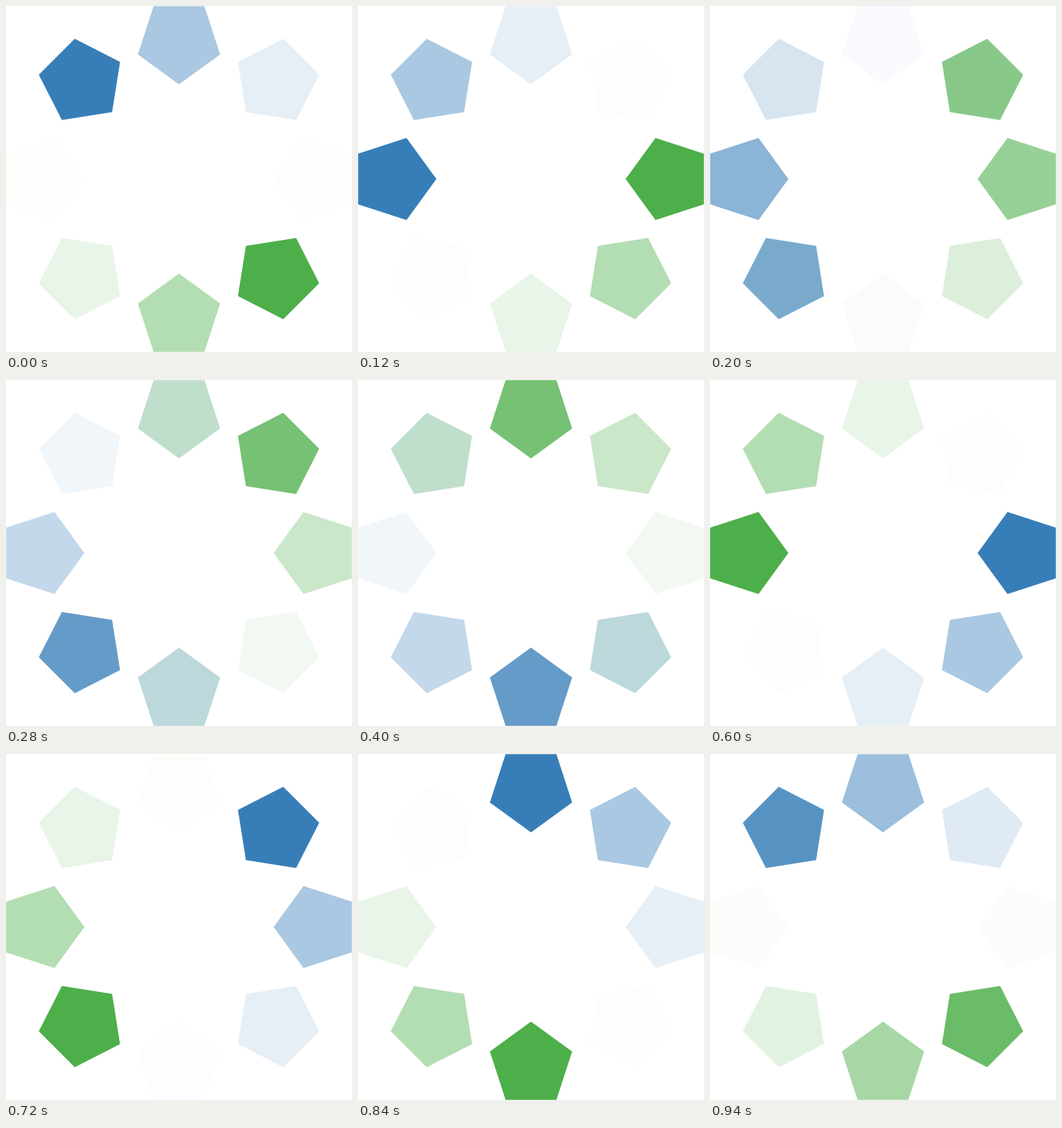
An HTML page with a canvas that plays this animation: 512 by 512 pixels, repeating every 960 ms.

```html
<!DOCTYPE html>
<html lang="en">
<head>
<meta charset="utf-8">
<title>Pentagon ring</title>
<style>
  html, body { margin: 0; width: 100%; height: 100%; overflow: hidden; background: #fff; }
  canvas { display: block; width: 512px; height: 512px; }
</style>
</head>
<body>
<canvas id="stage" width="512" height="512"></canvas>
<script>
const ctx = document.getElementById("stage").getContext("2d");
const LOOP = 960, TICK = 20, COUNT = 8;
const STEP = LOOP / COUNT, WAKE = LOOP / 2, FADE = WAKE - STEP;
const CENTER = 256, RING = 204, RADIUS = 64;
const BLUE = [55, 126, 184], GREEN = [77, 175, 74];

const mod = (a, n) => ((a % n) + n) % n;
const lerp = (a, b, t) => a + (b - a) * t;
const wake = age => (1 - age / WAKE) ** 3;

// One vertex of each pentagon points at the middle of the stage.
function pentagon(angle) {
  const cx = CENTER + RING * Math.cos(angle);
  const cy = CENTER + RING * Math.sin(angle);
  const path = new Path2D();
  for (let i = 0; i < 5; i++) {
    const a = angle + Math.PI + i * Math.PI * 2 / 5;
    path.lineTo(cx + RADIUS * Math.cos(a), cy + RADIUS * Math.sin(a));
  }
  path.closePath();
  return path;
}

const shapes = Array.from({ length: COUNT }, (_, i) =>
  pentagon((5 - i) * Math.PI / 4));

// Each pentagon fades in a cubic wake, then rises in the other colour.
function drawShape(shape, phase) {
  const age = phase % WAKE;
  const [color, next] = phase < WAKE ? [BLUE, GREEN] : [GREEN, BLUE];
  const rise = Math.max(0, (age - FADE) / STEP);
  const blend = 1 - (1 - rise) ** 3;
  const rgb = color.map((c, i) => Math.round(lerp(c, next[i], blend)));
  ctx.globalAlpha = rise ? lerp(wake(FADE), 1, rise) : wake(age);
  ctx.fillStyle = `rgb(${rgb})`;
  ctx.fill(shape);
}

function draw(time) {
  ctx.globalAlpha = 1;
  ctx.fillStyle = "#fff";
  ctx.fillRect(0, 0, 512, 512);
  shapes.forEach((shape, i) => drawShape(shape, mod(time - i * STEP, LOOP)));
}

const start = performance.now();
function frame() {
  const elapsed = performance.now() - start;
  draw(Math.floor(elapsed / TICK) * TICK % LOOP);
  requestAnimationFrame(frame);
}
frame();
</script>
</body>
</html>
```
